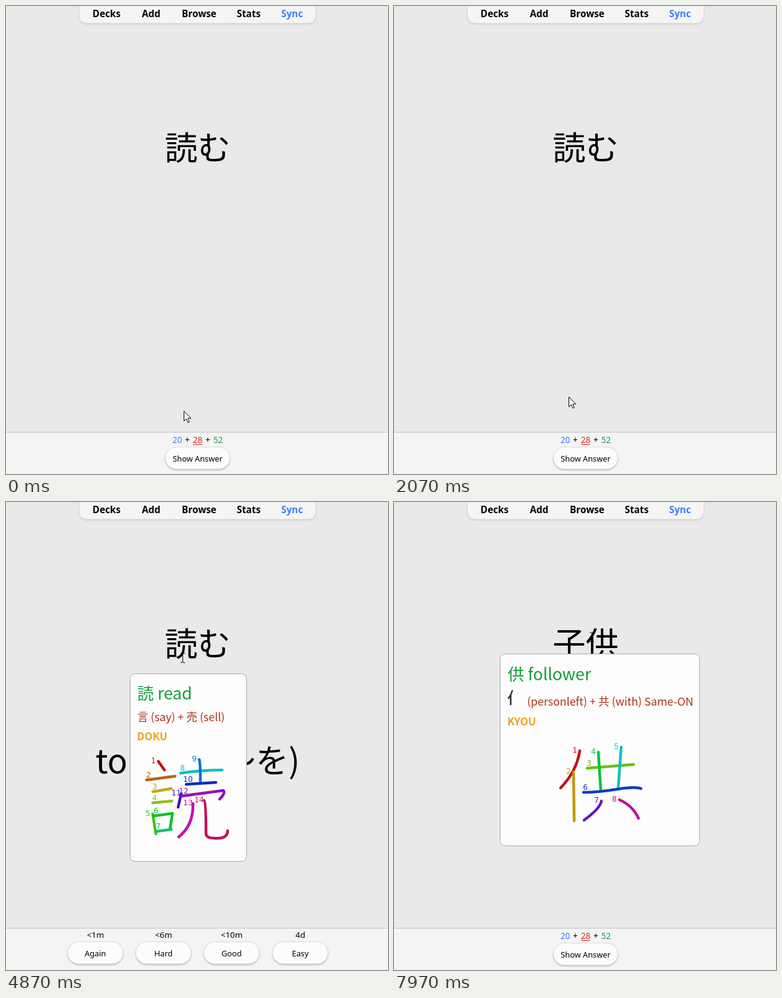
Recreate the animation shown at these times as an HTML page with a canvas. Size 617 by 756 pixels, loop 8 s.

```html
<!DOCTYPE html>
<html lang="en">
<head>
<meta charset="utf-8">
<title>Flashcards</title>
<style>
html, body { margin: 0; width: 100%; height: 100%; overflow: hidden; background: #e9e9e9; }
canvas { display: block; width: 617px; height: 756px; }
</style>
</head>
<body>
<canvas id="stage"></canvas>
<script>
const W = 617, H = 756, MID = 309.5, LOOP = 8000, STEP = 70;
const SHOW_AT = 3010, NEXT_AT = 6430;
const UI = '"Noto Sans", "Open Sans", sans-serif';
const CJK = '"Noto Sans CJK JP", "Noto Sans CJK", sans-serif';
const GREEN = '#169c3a', BROWN = '#ac3318', ORANGE = '#f0a31e';
const TITLE = '26.67px ' + CJK, LINE = '17.8px ' + CJK, READING = '700 17px ' + CJK;

const canvas = document.getElementById('stage');
const ctx = canvas.getContext('2d');
const dpr = window.devicePixelRatio || 1;
canvas.width = W * dpr;
canvas.height = H * dpr;

// Pointer trips: each eases to (x, y), swaying sideways on the way
const TRIPS = [
  { start: 10, end: 1000, x: 269, y: 256, sway: -21 },
  { start: 1690, end: 2470, x: 278, y: 725, sway: 10 },
  { start: 3740, end: 4570, x: 295, y: 280, sway: 17 },
  { start: 4570, end: 4870, x: 285, y: 252, sway: 0 },
  { start: 5420, end: 6190, x: 365, y: 727, sway: 29 },
  { start: 6500, end: 7200, x: 326, y: 247, sway: -15 },
  { start: 7200, end: 7440, x: 323, y: 218, sway: 0 },
  { start: 7900, end: 7970, x: 319, y: 218, sway: 0 }
];

const POPUPS = [
  { from: 1000, to: 1760, paint: readPopup },
  { from: 4720, to: 5490, paint: readPopup },
  { from: 7280, to: LOOP, paint: followPopup }
];

// Handwritten strokes in writing order
const READ = [
  'M230 423L240 437', 'M211 453L257 447', 'M221 472L251 467', 'M221 490L252 487',
  'M221 508L226 540', 'M223 511L253 507L249 531', 'M227 536L251 533',
  'M266 442Q300 437 333 437', 'M296 420Q298 424 298 458', 'M275 460L323 457',
  'M267 475L262 497', 'M268 479L335 470Q339 474 329 484',
  'M286 491Q287 526 263 545', 'M304 486Q307 488 307 538Q306 547 320 547Q342 549 342 535'
];
const FOLLOW = [
  'M300 402Q295 435 269 462', 'M290 436L291 515', 'M312 430L387 424', 'M330 404L334 466',
  'M367 396L362 464', 'M306 469Q330 469 360 464T399 463', 'M335 483Q333 495 307 514',
  'M364 481Q385 490 395 511'
];

const clamp = v => Math.min(1, Math.max(0, v));

function pointerAt(t) {
  let x = 287, y = 654;
  for (const trip of TRIPS) {
    if (t < trip.start) break;
    const elapsed = Math.floor((t - trip.start) / STEP) * STEP;
    const k = t >= trip.end ? 1 : elapsed / (trip.end - trip.start);
    const eased = 1 - (1 - k) ** 2.7;
    x += (trip.x - x) * eased + trip.sway * Math.sin(Math.PI * eased);
    y += (trip.y - y) * eased;
  }
  return { x: Math.round(x), y: Math.round(y) };
}

// The card fades out before each flip and in after it
function cardAlpha(t) {
  const gap = Math.min(Math.abs(t - SHOW_AT), Math.abs(t - NEXT_AT));
  return clamp((gap - 10) / 140);
}

function text(str, x, y, font, color, align = 'center') {
  ctx.font = font;
  ctx.fillStyle = color;
  ctx.textAlign = align;
  ctx.fillText(str, x, y);
}

function box(x, y, w, h, r, fill, border, shadow) {
  ctx.beginPath();
  ctx.roundRect(x, y, w, h, r);
  ctx.save();
  if (shadow) {
    ctx.shadowColor = shadow;
    ctx.shadowBlur = 3 * dpr;
    ctx.shadowOffsetY = 1.5 * dpr;
  }
  ctx.fillStyle = fill;
  ctx.fill();
  ctx.restore();
  ctx.strokeStyle = border;
  ctx.lineWidth = 1;
  ctx.stroke();
}

function button(label, x, y, w, mouse) {
  const over = mouse.x >= x && mouse.x <= x + w && mouse.y >= y && mouse.y <= y + 36;
  box(x + 0.5, y + 0.5, w - 1, 35.5, 18, '#fcfcfc', over ? '#b9b9b9' : '#dcdcdc', 'rgba(0,0,0,.3)');
  text(label, x + w / 2, y + 24, '500 12.8px ' + UI, '#000');
}

function navBar() {
  box(118.5, -20, 382, 48, 12, '#f5f5f5', '#dadada', 'rgba(0,0,0,.12)');
  const items = [['Decks', 162.5], ['Add', 234.5], ['Browse', 312], ['Stats', 392], ['Sync', 462]];
  for (const [name, x] of items) {
    text(name, x, 18, '700 15.3px ' + UI, name === 'Sync' ? '#3b82f6' : '#000');
  }
}

function bottomBar(answer, mouse) {
  ctx.fillStyle = '#f4f4f4';
  ctx.fillRect(0, 688, W, 68);
  ctx.fillStyle = '#c4c4c4';
  ctx.fillRect(0, 688, W, 1);
  if (answer) {
    const grades = [['Again', '<1m'], ['Hard', '<6m'], ['Good', '<10m'], ['Easy', '4d']];
    grades.forEach(([name, due], i) => {
      const x = Math.floor(99 + i * 110.4);
      text(due, x + 45.5, 704, '13.3px ' + UI, '#000');
      button(name, x, 710, 90.5, mouse);
    });
    return;
  }
  const counts = [['20', '#3b82f6'], ['+', '#000'], ['28', '#dc2626'], ['+', '#000'], ['52', '#16a34a']];
  counts.forEach(([s, color], i) => text(s, MID + (i - 2) * 16.5, 706, '13.7px ' + UI, color));
  ctx.fillStyle = '#dc2626';
  ctx.fillRect(302, 708, 15, 1);
  button('Show Answer', 257, 712, 105, mouse);
}

function card(answer, second, alpha) {
  const font = '53.33px ' + CJK;
  ctx.save();
  ctx.globalAlpha = alpha;
  text(second ? '子供' : '読む', MID, 249, font, '#000');
  if (answer) {
    text('よむ', MID, 327, font, '#000');
    text('to read (〜を)', MID, 438, font, '#000');
    box(289, 493, 41, 41, 20.5, '#fff', '#555');
    ctx.fillStyle = '#444';
    ctx.fill(new Path2D('M300.5 499.5L327 513.5L300.5 527.5Z'));
  }
  ctx.restore();
}

// Colours run once round the hue circle; a number sits above flat strokes, left of steep ones
function diagram(strokes) {
  ctx.lineWidth = 4.5;
  ctx.lineCap = ctx.lineJoin = 'round';
  strokes.forEach((d, i) => {
    const color = `hsl(${i * 360 / strokes.length}, 85%, 41%)`;
    const [x, y, x2, y2] = d.match(/\d+/g).map(Number);
    const flat = Math.abs(y2 - y) < Math.abs(x2 - x) / 3;
    ctx.strokeStyle = color;
    ctx.stroke(new Path2D(d));
    text(i + 1, x + (flat ? 3 : -8), y + (flat ? -4 : 3), '12px "DejaVu Sans", sans-serif', color);
  });
}

function readPopup(mouse) {
  ctx.translate(mouse.x - 269, mouse.y - 256);
  box(184.5, 281.5, 188, 303, 8, '#fdfdfd', '#a8a8a8');
  text('読 read', 196, 323, TITLE, GREEN, 'left');
  text('言 (say) + 売 (sell)', 196, 358, LINE, BROWN, 'left');
  text('DOKU', 195.5, 389, READING, ORANGE, 'left');
  diagram(READ);
}

function followPopup(mouse) {
  ctx.translate(mouse.x - 319, mouse.y - 218);
  box(171.5, 245.5, 322, 310, 8, '#fdfdfd', '#a8a8a8');
  text('供 follower', 183.5, 288, TITLE, GREEN, 'left');
  text('(personleft) + 共 (with) Same-ON', 215, 329, LINE, BROWN, 'left');
  text('KYOU', 183, 361, READING, ORANGE, 'left');
  ctx.strokeStyle = '#333';
  ctx.lineWidth = 2.6;
  ctx.lineCap = 'round';
  ctx.stroke(new Path2D('M191 305Q189 312 185 317M188.5 313V327'));
  diagram(FOLLOW);
}

function popup(t, mouse) {
  const p = POPUPS.find(p => t >= p.from && t < p.to);
  if (!p) return;
  const entering = t < p.from + STEP;
  ctx.save();
  ctx.globalAlpha = entering ? 0.5 : 1;
  ctx.translate(0, entering ? 7 : 0);
  p.paint(mouse);
  ctx.restore();
}

const ARROW = new Path2D('M.5 .5V16.5L4.2 13L6.8 18.8L9.2 17.8L6.7 12H11.8Z');
const BEAM = new Path2D('M-3 -7.5H-1L.5 -6.5L2 -7.5H4M.5 -6.5V6.5M-3 7.5H-1L.5 6.5L2 7.5H4');

function pointer({ x, y }, answer) {
  const overWord = Math.abs(x - MID) < 54 && y > 191 && y < (answer ? 345 : 266);
  const overMeaning = answer && Math.abs(x - MID) < 165 && y > 381 && y < 458;
  const shape = overWord || overMeaning ? BEAM : ARROW;
  ctx.save();
  ctx.translate(x, y);
  ctx.lineWidth = 1;
  ctx.lineCap = 'butt';
  ctx.lineJoin = 'miter';
  ctx.strokeStyle = '#000';
  ctx.fillStyle = '#fff';
  if (shape === ARROW) ctx.fill(shape);
  ctx.stroke(shape);
  ctx.restore();
}

function draw(t) {
  const mouse = pointerAt(t);
  const answer = t >= SHOW_AT && t < NEXT_AT;
  ctx.setTransform(dpr, 0, 0, dpr, 0, 0);
  ctx.fillStyle = '#e9e9e9';
  ctx.fillRect(0, 0, W, H);
  navBar();
  bottomBar(answer, mouse);
  card(answer, t >= NEXT_AT, cardAlpha(t));
  popup(t, mouse);
  pointer(mouse, answer);
}

const start = performance.now();
function tick() {
  draw((performance.now() - start) % LOOP);
  requestAnimationFrame(tick);
}
tick();
</script>
</body>
</html>
```
